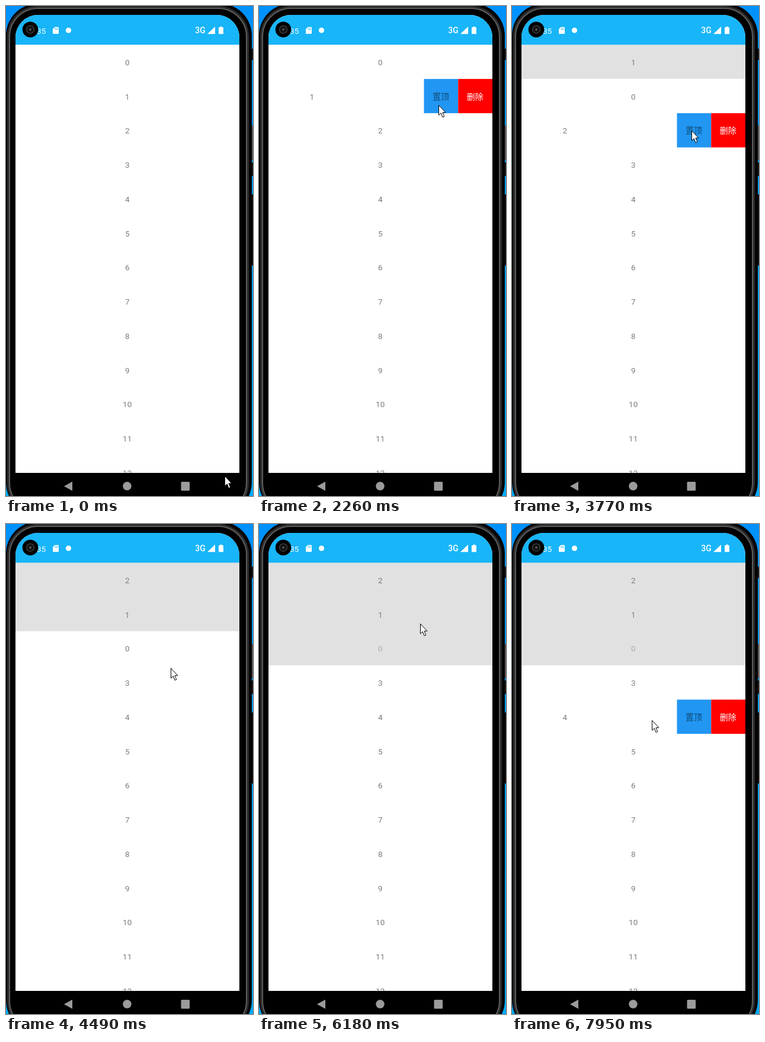
These frames come from a looping animation (417x827 px, 8000 ms). An HTML page:

```html
<!DOCTYPE html>
<html lang="zh">
<head>
<meta charset="utf-8">
<title>Swipe list</title>
<style>
  html, body { margin: 0; width: 100%; height: 100%; overflow: hidden; background: #0098fe; }
  svg { display: block; }
  text { font: 13.5px Roboto, sans-serif; text-anchor: middle; }
  #rows text { fill: #7d7d7d; }
  #menu text { font: 14px "Noto Sans CJK SC", "Noto Sans CJK", sans-serif; }
  .status { fill: #fff; }
  .status .network { font-weight: 500; font-size: 14px; }
</style>
</head>
<body>
<svg width="417" height="827" viewBox="0 0 417 827">
  <defs>
    <linearGradient id="sky" x2="0" y2="1">
      <stop offset="0" stop-color="#0091fd"/>
      <stop offset="1" stop-color="#00aaff"/>
    </linearGradient>
    <clipPath id="display"><path d="M16 788V53a38 38 0 0 1 38-38H356a38 38 0 0 1 38 38V788Z"/></clipPath>
  </defs>

  <rect width="417" height="827" fill="url(#sky)"/>
  <g fill="#161616">
    <rect x="414" y="72" width="3" height="19"/>
    <rect x="414" y="202" width="3" height="58" fill="#57504d"/>
    <rect x="414" y="264" width="3" height="23"/>
    <rect x="414" y="318" width="3" height="120" fill="#0d0908"/>
  </g>
  <rect y="-4" width="415" height="862" rx="54" fill="#050505"/>
  <g fill="none">
    <rect x="5" y="3" width="402" height="851" rx="49" stroke="#2c2c2c" stroke-width="6"/>
    <rect x="6" y="4" width="400" height="849" rx="48" fill="#000" stroke="#5c5c5c" stroke-width="2"/>
  </g>

  <g clip-path="url(#display)">
    <rect x="16" y="15" width="378" height="773" fill="#fff"/>
    <g id="rows"></g>
    <g id="menu">
      <rect x="278.5" width="57.75" height="57.75" fill="#2196f3"/>
      <rect x="336.25" width="57.75" height="57.75" fill="#f00"/>
      <text x="307" y="34.5" fill="#104a75">置顶</text>
      <text x="364.7" y="34.5" fill="#fff">删除</text>
    </g>
    <rect x="16" y="15" width="378" height="50.4" fill="#18b5f9"/>
  </g>

  <g class="status">
    <text x="59.7" y="46.5">35</text>
    <path d="M82.5 35.5H88a1 1 0 0 1 1 1V46a1 1 0 0 1-1 1H80a1 1 0 0 1-1-1V39Z"/>
    <path d="M83 37.5v2.5M85 37.5v2.5M87 37.5v2.5" stroke="#18b5f9"/>
    <circle cx="105.5" cy="41" r="4.6"/>
    <text class="network" x="328" y="46">3G</text>
    <path d="M340 47.3L353 34.8V47.3Z"/>
    <path d="M361.3 36v-1.3h3.6V36h2.1V47.3h-8V36Z"/>
  </g>
  <circle cx="41" cy="39.7" r="13.3"/>
  <circle cx="41" cy="39.7" r="6.5" fill="#111" stroke="#3a3a3a" stroke-width="1.6"/>
  <circle cx="41" cy="39.7" r="2" fill="#555"/>

  <g fill="#9b9b9b">
    <path d="M98 810.5L112 802.8V818.2Z"/>
    <circle cx="204.5" cy="810.3" r="7.2"/>
    <rect x="295.5" y="803" width="14.6" height="15" rx="1.6"/>
  </g>

  <path id="cursor" d="M.5 .5V17.2L4.3 13.7L7 20.7L9.8 19.5L7 12.8H12Z" fill="#fff" stroke="#000"/>
</svg>

<script>
const LOOP = 8000, TOP = 65.4, ROW = 57.75, ROW_COUNT = 13;
const CENTER = 204.7, MENU = 2 * ROW, PIN_BUTTON = 303;
const $ = id => document.getElementById(id);

// Each swipe drags an item open between grab and open, reaches the pin button
// at aim, pins the item at tap and lets the pointer go on at leave.
const swipes = [
  { item: 1, grab: 1180, open: 1530, aim: 2110, tap: 2330, leave: 2655, pull: 119, y: 167 },
  { item: 2, grab: 3220, open: 3350, aim: 3770, tap: 4040, leave: 3970, pull: 79, y: 210 },
  { item: 0, grab: 4920, open: 5180, aim: 5580, tap: 5710, leave: 5985, pull: 112, y: 213, pinnedColor: "#acacac" },
  { item: 4, grab: 7640, open: 7810, aim: 8010, tap: 8200, leave: 8200, pull: 75, y: 331 },
];

// Pointer positions between the swipes: time, x, y
const wander = [
  [0, 369, 795], [130, 317, 553], [255, 317, 553], [380, 294, 453], [515, 294, 453], [1000, 232, 180],
  [3150, 269, 209],
  [4280, 293, 350], [4490, 278, 243], [4710, 270, 222],
  [6180, 272, 168], [6500, 250, 260], [6810, 268, 357], [7410, 268, 330],
];

const pointerPath = swipes.flatMap(({ grab, open, aim, leave, pull, y }) => [
  [grab, pull + MENU, y], [open, pull, y], [aim, PIN_BUTTON, y], [leave, PIN_BUTTON, y],
]).concat(wander).sort((a, b) => a[0] - b[0]);

const progress = (t, from, to) => Math.min(1, Math.max(0, (t - from) / (to - from)));

function pointerAt(t) {
  const next = pointerPath.findIndex(key => key[0] > t);
  const [t0, x0, y0] = pointerPath[next - 1];
  const [t1, x1, y1] = pointerPath[next];
  const k = progress(t, t0, t1);
  return [x0 + (x1 - x0) * k, y0 + (y1 - y0) * k].map(Math.round);
}

function add(parent, tag, attrs) {
  const node = document.createElementNS("http://www.w3.org/2000/svg", tag);
  for (const name in attrs) node.setAttribute(name, attrs[name]);
  return parent.appendChild(node);
}

const items = Array.from({ length: ROW_COUNT }, (_, i) => i);
const rows = items.map(i => ({
  back: add($("rows"), "rect", { x: 16, y: TOP + i * ROW, width: 378, height: ROW + 0.1 }),
  label: add($("rows"), "text", { y: TOP + i * ROW + 34.5 }),
}));

function draw(t) {
  const tapped = swipes.filter(swipe => swipe.tap <= t);
  const pinned = tapped.map(swipe => swipe.item).sort((a, b) => b - a);
  const order = [...pinned, ...items.filter(item => !pinned.includes(item))];
  const current = swipes[tapped.length];
  const offset = MENU * progress(t, current.grab, current.open);

  rows.forEach(({ back, label }, i) => {
    const item = order[i];
    back.setAttribute("fill", i < pinned.length ? "#e1e1e1" : "#fff");
    label.textContent = item;
    label.setAttribute("x", CENTER - (item === current.item ? offset : 0));
    label.style.fill = tapped.find(swipe => swipe.item === item)?.pinnedColor ?? "";
  });
  const menuY = TOP + order.indexOf(current.item) * ROW;
  $("menu").setAttribute("transform", `translate(${MENU - offset} ${menuY})`);
  $("cursor").setAttribute("transform", `translate(${pointerAt(t)})`);
}

const start = performance.now();
function frame() {
  draw((performance.now() - start) % LOOP);
  requestAnimationFrame(frame);
}
frame();
</script>
</body>
</html>
```
